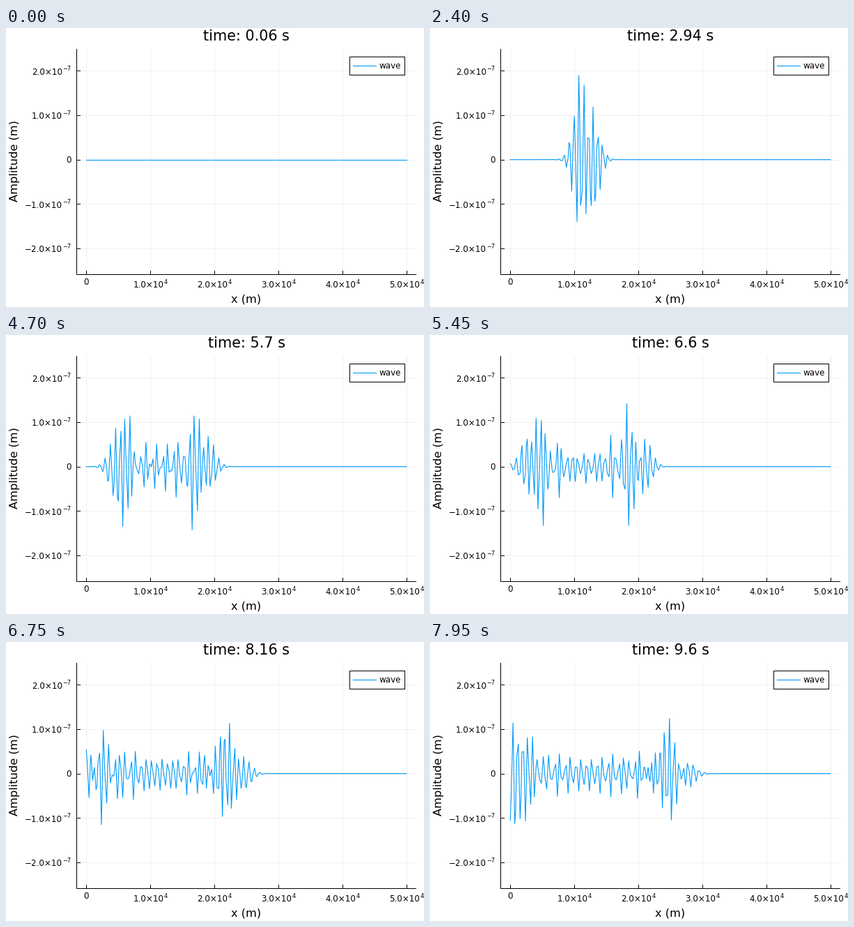
Write a matplotlib script that moves like this. It is 600 px wide and 400 px high and loops after 8 s.

```python
import numpy as np
import matplotlib.pyplot as plt
from matplotlib.animation import FuncAnimation
from matplotlib.patches import Rectangle

W, H = 600, 400
FRAMES, STEP = 160, 0.06
BLUE = "#009afa"

# Spectral element model of a 1D elastic bar with free ends
LENGTH, CELLS, ORDER = 50000.0, 60, 4
SPEED, SUB = 2250.0, 12
FREQ, DELAY, WIDTH, PHASE = 3.0, 2.3, 0.42, -1.32
PEAK, PEAK_FRAME = 1.58e-7, 69


def gll(n):
    """Nodes, weights and derivative matrix of the n-th order GLL rule."""
    p = np.polynomial.legendre.Legendre.basis(n)
    z = np.concatenate(([-1.0], np.sort(p.deriv().roots().real), [1.0]))
    pz = p(z)
    w = 2 / (n * (n + 1) * pz ** 2)
    gap = z[:, None] - z[None, :] + np.eye(n + 1)
    d = pz[:, None] / pz[None, :] / gap
    np.fill_diagonal(d, 0)
    d[0, 0], d[n, n] = -n * (n + 1) / 4, n * (n + 1) / 4
    return z, w, d


def force(t):
    s = t - DELAY
    return np.exp(-0.5 * (s / WIDTH) ** 2) * np.cos(2 * np.pi * FREQ * s + PHASE)


def simulate():
    z, w, d = gll(ORDER)
    size = LENGTH / CELLS
    count = CELLS * ORDER + 1
    x, mass, stiff = np.zeros(count), np.zeros(count), np.zeros((count, count))
    local = SPEED ** 2 * (2 / size) * d.T @ np.diag(w) @ d
    for e in range(CELLS):
        i = np.arange(e * ORDER, (e + 1) * ORDER + 1)
        x[i] = size * (e + (z + 1) / 2)
        mass[i] += w * size / 2
        stiff[np.ix_(i, i)] += local
    op = stiff / mass[:, None]
    src = (CELLS // 4 - 1) * ORDER + 1
    dt = STEP / SUB
    u, v = np.zeros(count), np.zeros(count)
    shots = []
    for n in range(FRAMES * SUB):
        a = -op @ u
        a[src] += force(n * dt) / mass[src]
        v += dt * a
        u = u + dt * v
        if (n + 1) % SUB == 0:
            shots.append(u)
    shots = np.array(shots)
    return x, shots * PEAK / np.abs(shots[PEAK_FRAME]).max()


def px(size):
    return size * 0.72


def put(x, y, s, size=11.85, **kw):
    return stage.text(x, y, s, fontsize=px(size), **kw)


def power(right, base_y, mantissa, exponent):
    put(right, base_y, mantissa + "×10", ha="right")
    put(right + 0.3, base_y - 5.4, exponent, 8.3)


def seg(xs, ys, color="black", width=1.0, **kw):
    return stage.plot(xs, ys, color=color, lw=px(width), **kw)[0]


plt.rcParams["font.family"] = "DejaVu Sans"
fig = plt.figure(figsize=(6, 4), dpi=100, facecolor="white")
stage = fig.add_axes([0, 0, 1, 1])
stage.set_xlim(0, W)
stage.set_ylim(H, 0)
stage.axis("off")

LEFT, RIGHT, TOP, BOTTOM = 101.2, 588.4, 30.3, 352.8
X0, PER_M = 115.3, 9.192e-3
Y0, PER_AMP = 188.7, 63.7e7

for k in range(6):
    gx = X0 + k * 1e4 * PER_M
    seg([gx, gx], [TOP, BOTTOM], "#ebebeb", 0.8)
    seg([gx, gx], [BOTTOM, BOTTOM - 4.8])
    if k:
        power(gx + 19.2, 372.3, f"{k}.0", "4")
    else:
        put(gx, 368.5, "0", ha="center")
for k in range(-2, 3):
    gy = Y0 - k * 1e-7 * PER_AMP
    seg([LEFT, RIGHT], [gy, gy], "#ebebeb", 0.8)
    seg([LEFT, LEFT + 4.8], [gy, gy])
    if k:
        sign = "−" if k < 0 else ""
        power(81, gy + 5.3, f"{sign}{abs(k)}.0", "−7")
    else:
        put(93.3, gy + 4.4, "0", ha="right")
seg([LEFT, LEFT, RIGHT], [TOP, BOTTOM, BOTTOM], solid_joinstyle="miter")

put(345, 393, "x (m)", 16.3, ha="center")
put(19.8, 190.5, "Amplitude (m)", 16.3, ha="right", va="center", rotation=90)
title = put(345, 18, "", 20.75, ha="center")

wave = seg([], [], BLUE, 1.1, solid_joinstyle="round", zorder=4)
wave.set_clip_path(Rectangle((LEFT, TOP), RIGHT - LEFT, BOTTOM - TOP,
                             transform=stage.transData))

stage.add_patch(Rectangle((492.8, 40.8), 79, 26.4, fc="white", ec="black",
                          lw=px(1), zorder=5))
seg([498, 531], [54.2, 54.2], BLUE, 1.1, zorder=6)
put(535.3, 58.5, "wave", zorder=6)

grid, shots = simulate()


def draw(n):
    wave.set_data(X0 + grid * PER_M, Y0 - shots[n] * PER_AMP)
    title.set_text(f"time: {(n + 1) * STEP!r} s")
    return wave, title


anim = FuncAnimation(fig, draw, frames=FRAMES, interval=50, repeat=True,
                     repeat_delay=0, blit=False)
plt.show()
```
